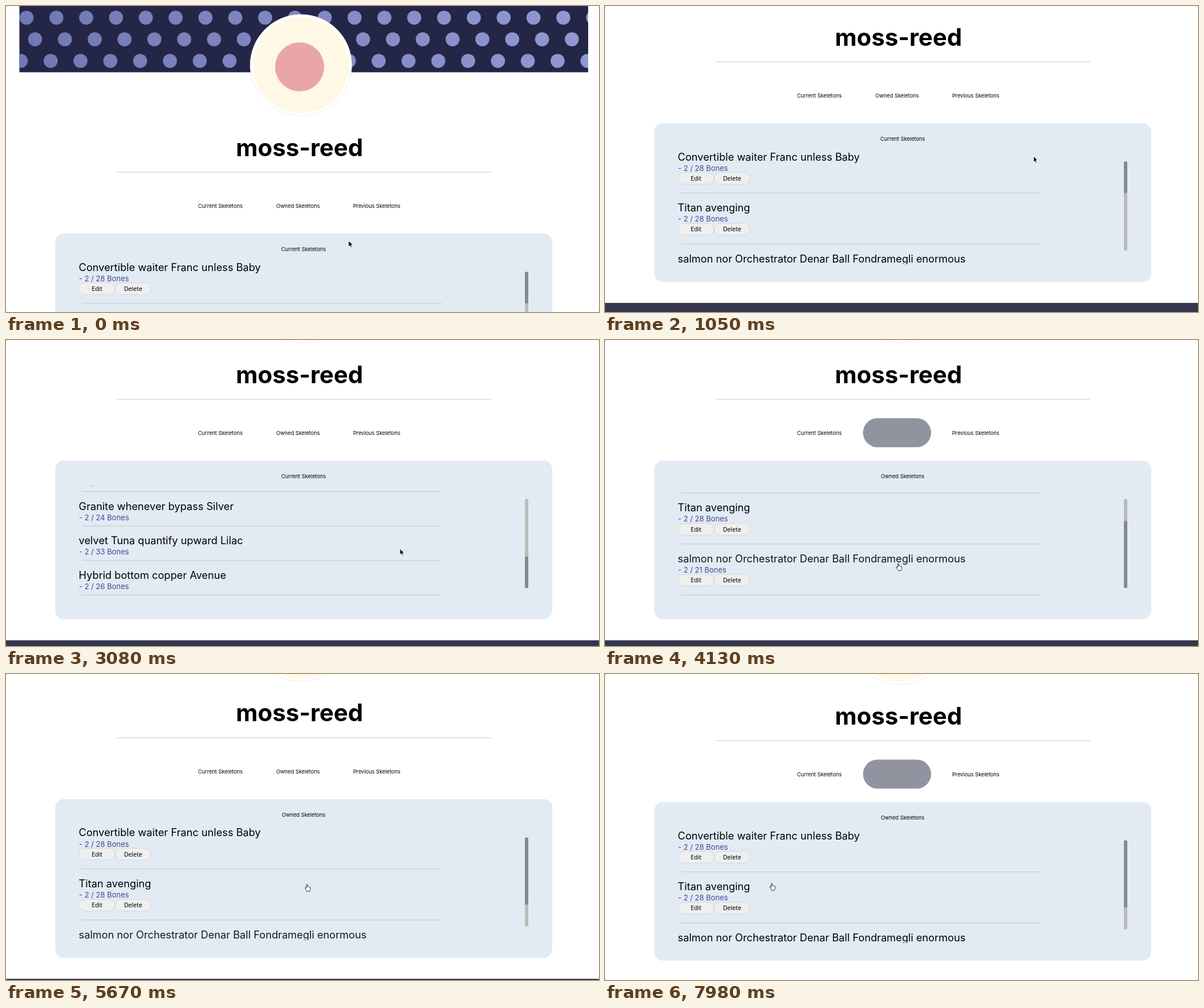
Recreate the animation shown at these times as an HTML page. Size 1040x538 px, loop 8 s.

```html
<!DOCTYPE html>
<html lang="en">
<head>
<meta charset="utf-8">
<title>Skeleton profile</title>
<style>
  html, body { margin: 0; width: 100%; height: 100%; overflow: hidden; background: #777; }
  #stage { display: block; width: 1040px; height: 538px; background: #fff; border-radius: 2px; }
  text { font-family: Inter, "Noto Sans", sans-serif; white-space: pre; }
  .mid { text-anchor: middle; }
  .name { font-size: 41.9px; font-weight: 700; }
  .label { font-size: 9.25px; }
  .head { font-size: 18.2px; }
  .bones { font-size: 13px; fill: #424b8f; }
  .btn { font: 10.5px "Noto Sans", "Open Sans", sans-serif; }
</style>
</head>
<body>
<svg id="stage" viewBox="0 0 1040 538" xmlns="http://www.w3.org/2000/svg">
  <defs>
    <linearGradient id="dots" gradientUnits="userSpaceOnUse" x1="24" y1="0" x2="1021" y2="0">
      <stop offset="0" stop-color="#7178b2"/>
      <stop offset="1" stop-color="#9198d2"/>
    </linearGradient>
  </defs>
  <g id="page">
    <svg x="23.5" y="0" width="997.5" height="116.5" viewBox="23.5 0 997.5 116.5">
      <rect x="23" width="999" height="117" fill="#232646"/>
      <g id="banner" fill="url(#dots)"></g>
    </svg>
    <circle cx="517.3" cy="104" r="89" fill="#fff" stroke="#ececee"/>
    <circle cx="517.3" cy="104" r="84" fill="#fff8e5"/>
    <circle cx="515" cy="107" r="43" fill="#e8a6a8"/>
    <text class="name mid" x="514.7" y="263.6">moss-reed</text>
    <rect x="194" y="291.6" width="657" height="1.2" fill="#cdd1d1"/>
    <g id="tabs"></g>
    <rect x="86.5" y="400" width="871.5" height="279" rx="15" fill="#e2eaf4"/>
    <text id="title" class="label mid" x="522" y="431.2"></text>
    <svg x="120" y="444" width="700" height="203.6" viewBox="120 0 700 203.6">
      <g id="list"></g>
    </svg>
    <g id="bar">
      <rect x="910" y="467.3" width="6" height="157" rx="3" fill="#bbbbbc"/>
      <rect id="thumb" x="910" width="6" rx="3" fill="#88898d"/>
    </g>
    <rect y="716" width="1040" height="60" fill="#34374e"/>
  </g>
  <g id="cursor" stroke-linejoin="round">
    <path id="arrow" d="M0 0V10.6L2.4 8.4L4 12.2L5.8 11.4L4.2 7.7H7.5Z" fill="#000" stroke="#fff" stroke-width=".9"/>
    <path id="hand" transform="translate(2 6)" fill="#fff" stroke="#111" stroke-width=".9"
      d="M-2.6 -5c0-1.3 1.9-1.3 1.9 0V-1.6c.5-.7 1.6-.6 1.8 .2c.5-.5 1.6-.4 1.7 .4c.6-.4 1.6-.1 1.6 .8V2.2c0 2-1 2.6-1.2 4.2H-1.6C-2 4.6-4.6 2.4-5 .6c-.3-1.2 1.2-1.5 2.4 .4Z"/>
  </g>
</svg>
<script>
const LOOP = 8000, STEP = 70, FADE = 500;
const LIST_Y = 444, VIEW_H = 203, TRACK_Y = 467.3, TRACK_H = 157;
const ROW = 60.6, TALL_ROW = 89.6, OWN_H = 3 * TALL_ROW, TEXT_X = 127.6;
const CURRENT = 0, OWNED = 1, PREVIOUS = 2;
const $ = id => document.getElementById(id);
const clamp = v => Math.max(0, Math.min(1, v));
const smooth = v => v * v * (3 - 2 * v);

const add = (parent, tag, attrs, text = '') => {
  const el = document.createElementNS('http://www.w3.org/2000/svg', tag);
  for (const k in attrs) el.setAttribute(k, attrs[k]);
  el.textContent = text;
  return parent.appendChild(el);
};

[36, 51, 26].forEach((left, row) => {
  for (let x = left; x < 1035; x += 52.3) {
    add($('banner'), 'circle', { cx: x, cy: 20.5 + 38 * row, r: 12.3 });
  }
});

const tabs = [
  ['Current Skeletons', 376, 122],
  ['Owned Skeletons', 512.2, 119.5],
  ['Previous Skeletons', 650.2, 125.5]
].map(([text, x, w]) => ({
  text,
  pill: add($('tabs'), 'rect', { x: x - w / 2, y: 325.4, width: w, height: 51.2, rx: 25.6, fill: '#42455c' }),
  label: add($('tabs'), 'text', { class: 'label mid', x, y: 354.7 }, text),
  hit: s => Math.abs(s.x - x) < w / 2 && Math.abs(s.y + s.page - 351) < 25.6,
  paint(level) {
    const c = Math.round(255 * level);
    this.pill.setAttribute('opacity', level);
    this.label.setAttribute('fill', `rgb(${c},${c},${c})`);
  }
}));

// Heading, number of bones, own skeleton
const rows = [
  ['Convertible waiter Franc unless Baby', 28, true],
  ['Titan avenging', 28, true],
  ['salmon nor Orchestrator Denar Ball Fondramegli enormous', 21, true],
  ['National connecting South Soul recontextualize', 37],
  ['markets North compelling Cambridgeshire initiatives brr…', 30],
  ['Granite whenever bypass Silver', 24],
  ['velvet Tuna quantify upward Lilac', 33],
  ['Hybrid bottom copper Avenue', 26]
];
const linkColour = [138, 147, 190];
let listH = 0;

const addButton = (g, text, x) => {
  add(g, 'rect', { x, y: 42.6, width: 62.7, height: 20.8, rx: 10.4, fill: '#efefef', stroke: '#c9cdd3', 'stroke-width': .7 });
  add(g, 'text', { class: 'btn mid', x: x + 31.4, y: 56.8 }, text);
};

const items = rows.map(([text, bones, own]) => {
  const y = listH, height = own ? TALL_ROW : ROW;
  const g = add($('list'), 'g', { transform: `translate(0 ${y})` });
  const head = add(g, 'text', { class: 'head', x: TEXT_X, y: 21.6 }, text);
  add(g, 'text', { class: 'bones', x: 128, y: 39.7 }, `- 2 / ${bones} Bones`);
  if (own) {
    addButton(g, 'Edit', 128.3);
    addButton(g, 'Delete', 191.5);
  }
  add(g, 'rect', { x: 133, y: height - 11.3, width: 631, height: 1, fill: '#c2c8d0' });
  listH += height;
  const right = TEXT_X + head.getComputedTextLength();
  const shown = view => view === CURRENT || (view === OWNED && own);
  return {
    g, shown,
    hit(s) {
      const inList = s.y + s.page - LIST_Y, inRow = inList + s.scroll - y;
      return shown(s.view) && inList > 0 && inList < VIEW_H &&
        inRow > 2 && inRow < 28 && s.x > TEXT_X && s.x < right;
    },
    paint(level) {
      head.setAttribute('fill', `rgb(${linkColour.map(c => Math.round(c * level))})`);
    }
  };
});

// Each move is [begin, end, ...goal]
const follow = (from, moves, t) => moves.reduce((pos, [a, b, ...goal]) => {
  const p = smooth(clamp((t - a) / (b - a)));
  return pos.map((v, i) => v + (goal[i] - v) * p);
}, from);

const pageMoves = [[630, 1050, 194], [1120, 1680, 188], [5390, 5880, 175]];
const listMoves = [[1750, 2560, listH - VIEW_H], [3639, 3640, OWN_H - VIEW_H], [5080, 5530, 0]];
const cursorMoves = [
  [0, 280, 751.5, 264], [1190, 1680, 691, 367], [3080, 3360, 512, 158], [3920, 4130, 514, 393],
  [5600, 5950, 643, 170], [6790, 7000, 511, 170], [7770, 7980, 292, 368]
];
const clicks = [[0, CURRENT], [3640, OWNED], [6510, PREVIOUS], [7350, OWNED]];

const stateAt = t => {
  const [x, y] = follow([600.8, 412.7], cursorMoves, t);
  const [page] = follow([0], pageMoves, t);
  const [scroll] = follow([0], listMoves, t);
  return { x, y, page, scroll, view: clicks.findLast(c => c[0] <= t)[1] };
};

// Links fade in under the cursor and out after it leaves
const links = [...tabs, ...items];
const frames = [];
let levels = links.map(() => 0);
for (let t = 0; t < LOOP; t += STEP) {
  const s = stateAt(t);
  levels = links.map((link, i) => clamp(levels[i] + (link.hit(s) ? STEP : -STEP) / FADE));
  frames.push({ ...s, levels });
}

function draw(time) {
  const { x, y, page, scroll, view, levels } = frames[Math.floor(time / STEP)];
  $('page').setAttribute('transform', `translate(0 ${-page})`);
  $('list').setAttribute('transform', `translate(0 ${-scroll})`);
  $('title').textContent = tabs[view].text;
  for (const item of items) item.g.style.display = item.shown(view) ? '' : 'none';
  links.forEach((link, i) => link.paint(levels[i]));

  const contentH = view === CURRENT ? listH : OWN_H;
  $('bar').style.display = view === PREVIOUS ? 'none' : '';
  $('thumb').setAttribute('y', TRACK_Y + scroll / contentH * TRACK_H);
  $('thumb').setAttribute('height', VIEW_H / contentH * TRACK_H);

  const hand = levels.some(v => v > 0);
  $('cursor').setAttribute('transform', `translate(${x} ${y})`);
  $('hand').style.display = hand ? '' : 'none';
  $('arrow').style.display = hand ? 'none' : '';
}

const begin = performance.now();
function tick() {
  draw((performance.now() - begin) % LOOP);
  requestAnimationFrame(tick);
}
tick();
</script>
</body>
</html>
```
